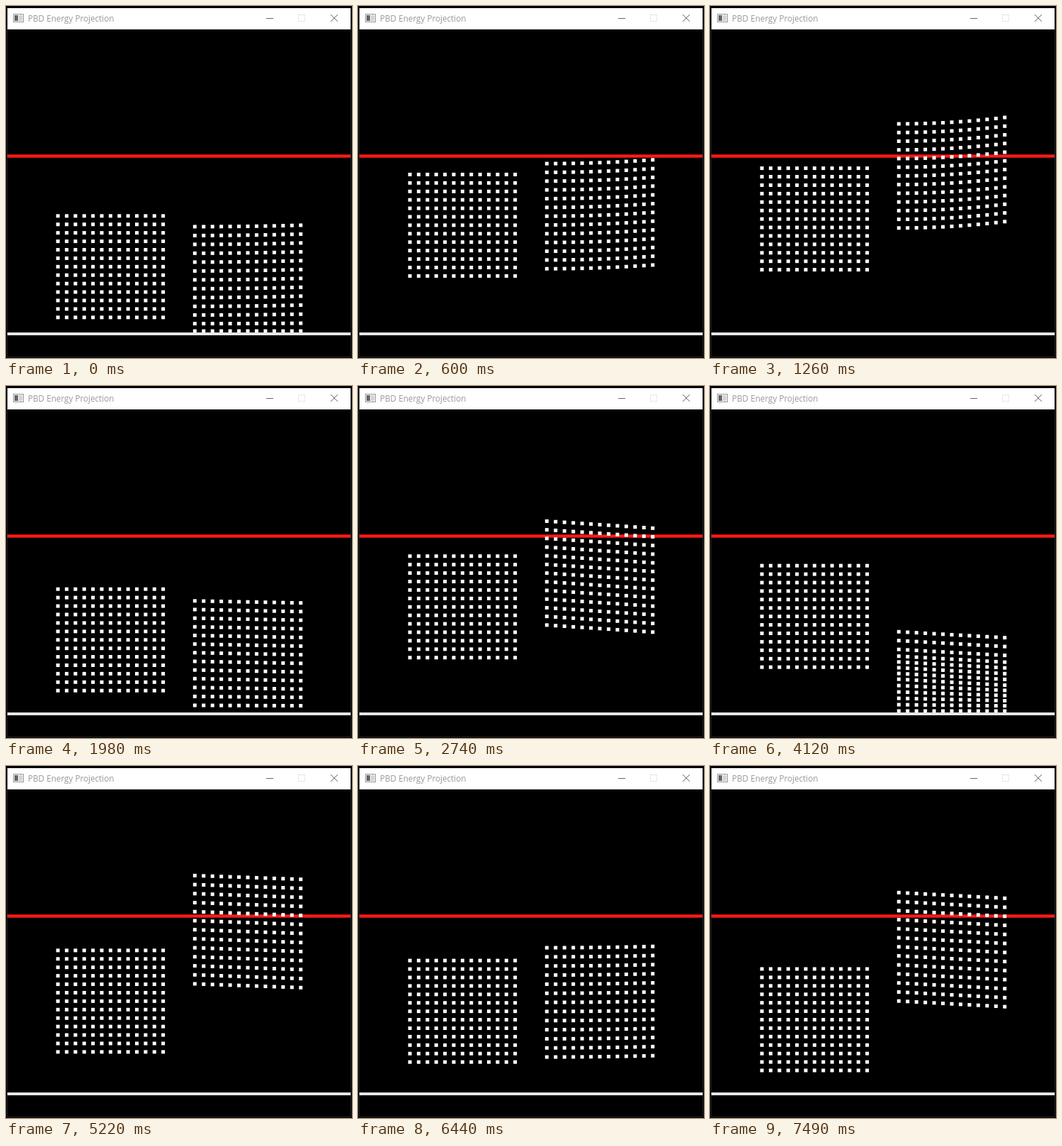
Write an HTML page with a canvas that moves like this. It is 488 px wide and 496 px high and loops after 7.51 s.

```html
<!DOCTYPE html>
<html lang="en">
<head>
<meta charset="utf-8">
<title>PBD Energy Projection</title>
<style>
  html, body { margin: 0; width: 100%; height: 100%; overflow: hidden; background: #000; }
  svg, canvas { position: absolute; left: 0; top: 0; display: block; }
  text { font: 11.7px "Open Sans", "Noto Sans", sans-serif; fill: #999; }
</style>
</head>
<body>
<canvas id="scene" width="488" height="496"></canvas>
<svg width="488" height="496" viewBox="0 0 488 496">
  <path d="M1.5 33V494.5H486.5V33" fill="none" stroke="#282626"/>
  <rect x="2" y="3" width="484" height="30" fill="#fff"/>
  <rect x="10.5" y="11.5" width="14" height="11" fill="#f4f4f4" stroke="#999"/>
  <rect x="12" y="13" width="5" height="8" fill="#666"/>
  <rect x="18" y="13" width="5" height="8" fill="#d4d4d4"/>
  <text x="31" y="22">PBD Energy Projection</text>
  <g fill="none">
    <path d="M367 17.5H377" stroke="#666"/>
    <rect x="412.5" y="12.5" width="9" height="9" stroke="#e6e6e6"/>
    <path d="M458 12L468 22M468 12L458 22" stroke="#666"/>
  </g>
</svg>
<script>
const LOOP = 7510, STEP = 20;
const N = 13, DOT = 5;
const FLOOR = 458;        // centre of a dot resting on the floor
const HALF_G = 208;       // half of gravity, px/s²
const ctx = document.getElementById('scene').getContext('2d');

// Tilt of the right block, one key point every 1.25 s
const TILT = [-2, -9, 10, 9, 6, -2.5, 8];

// land: first landing, fall: seconds from apex to floor,
// loss: fall time lost per bounce, contact: seconds on the floor
const blocks = [
  {
    x: 73.2, gap: 12.37, land: .062, fall: .775, loss: .065, contact: .19,
    height: () => 143,
    tilt: () => 0
  },
  {
    x: 266.3, gap: 12.45, land: -.005, fall: .86, loss: .004, contact: .295,
    height: t => 150 - 4 * Math.cos(2 * Math.PI * (t - 2.1) / 8.6),
    tilt: t => ease(TILT, t / 1.25)
  }
];

function ease(keys, pos) {
  const i = Math.min(Math.floor(pos), keys.length - 2);
  const u = Math.min(1, pos - i);
  return keys[i] + (keys[i + 1] - keys[i]) * u * u * (3 - 2 * u);
}

// Returns the y of a row that sits h (0..1) up the block.
function rowMotion({ land, fall, loss, contact }, t, height) {
  while (t >= land + contact) {
    fall -= loss;
    land += contact + 2 * fall;
  }
  if (t < land) {
    const bottom = FLOOR - HALF_G * (fall ** 2 - (t - land + fall) ** 2);
    return h => bottom - h * height;
  }
  // a compression wave climbs the block, then a release wave comes down
  const dt = t - land, speed = HALF_G * (2 * fall - loss);
  return h => {
    const stop = h * contact / 2;
    const squash = Math.min(dt, stop) - Math.max(0, dt - contact + stop);
    return FLOOR - h * height + speed * squash;
  };
}

function drawBlock(block, t) {
  const tilt = block.tilt(t);
  const rowY = rowMotion(block, t, block.height(t));
  for (let r = 0; r < N; r++) {
    const base = rowY(r / (N - 1));
    const free = Math.min(1, (FLOOR - base) / 40);   // rows flatten near the floor
    for (let c = 0; c < N; c++) {
      const u = c / (N - 1);
      const lean = (tilt < 0 ? u * u : u) - .5;
      const y = Math.min(FLOOR, base + tilt * free * lean);
      ctx.fillRect(block.x + c * block.gap - DOT / 2, y - DOT / 2, DOT, DOT);
    }
  }
}

function bar(y, height, color) {
  ctx.fillStyle = color;
  ctx.fillRect(2, y, 484, height);
}

function draw(ms) {
  const t = Math.floor(ms / STEP) * STEP / 1000;
  ctx.fillStyle = '#000';
  ctx.fillRect(0, 0, 488, 496);
  bar(209.3, 4.4, '#ff1a1a');
  ctx.fillStyle = '#fff';
  blocks.forEach(b => drawBlock(b, t));
  bar(460, 4, '#e6e6e6');
}

const start = performance.now();
function tick() {
  draw((performance.now() - start) % LOOP);
  requestAnimationFrame(tick);
}
tick();
</script>
</body>
</html>
```
